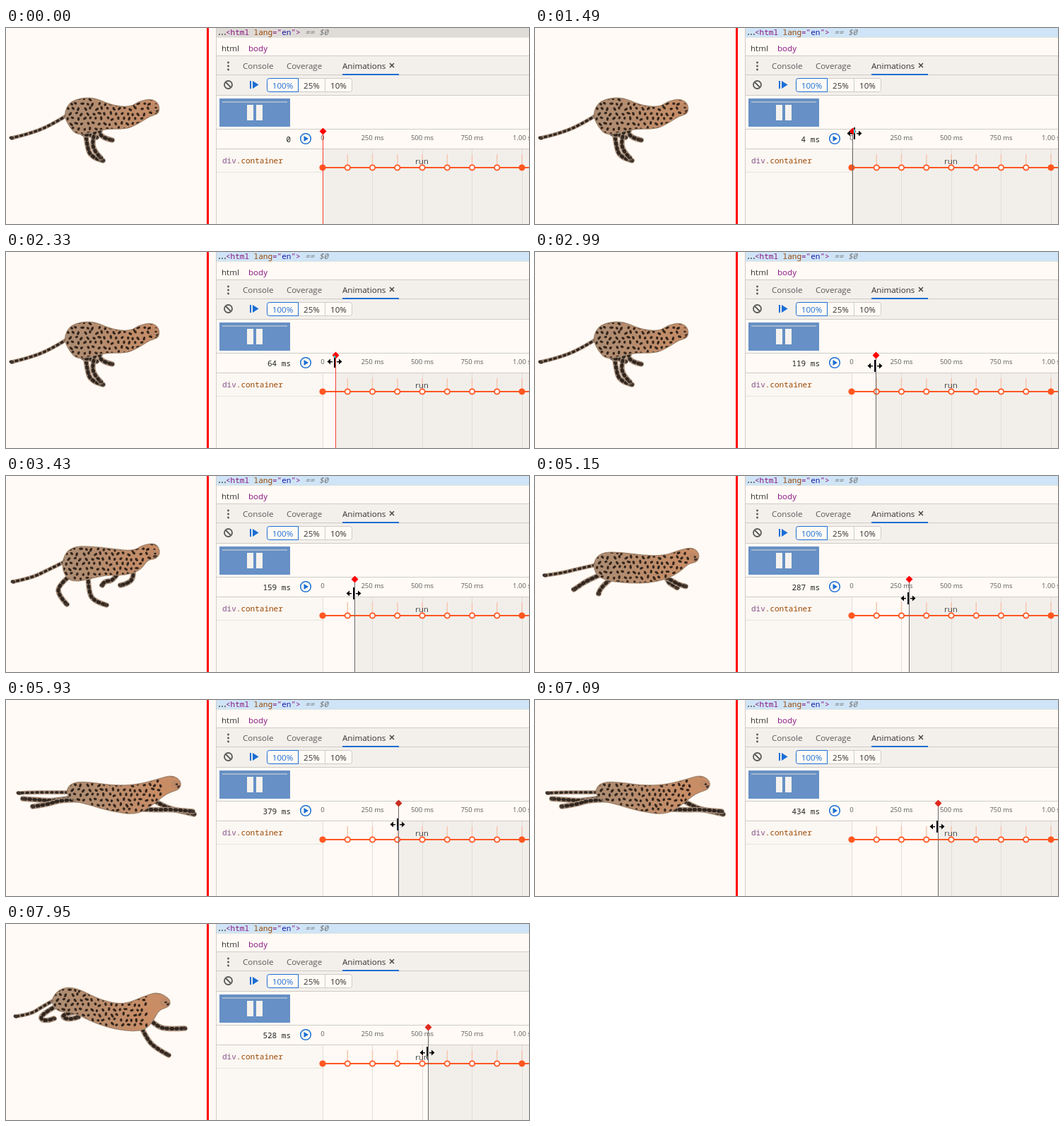
Animation of 740x278 px, one loop 8 s. Source, as an HTML page with a canvas:

```html
<!DOCTYPE html>
<html lang="en">
<head>
<meta charset="utf-8">
<title>Scrubbing an animation timeline</title>
<style>
html, body { margin: 0; width: 100%; height: 100%; overflow: hidden; background: #fffaf5; }
canvas { display: block; }
</style>
</head>
<body>
<canvas id="stage" width="740" height="278"></canvas>
<script>
const c = document.getElementById('stage').getContext('2d');
const SANS = '"Open Sans", sans-serif', MONO = '"Noto Sans Mono", monospace';
const CREAM = '#fffaf5', GREY = '#f3efeb', EDGE = '#cfcbc7', BLUE = '#1a6fd4', ORANGE = '#ff5722';
const LOOP = 8000, X0 = 448, SCALE = 0.282;

// Scrubber moves: start, end, steps, value in ms, cursor y
const MOVES = [
  [1240, 1490, 4, 4, 149], [1550, 1620, 2, 14, 150], [1860, 2100, 4, 60, 154],
  [2330, 2330, 1, 64, 155], [2490, 2570, 2, 89, 157], [2720, 3270, 8, 149, 165],
  [3430, 3430, 1, 159, 166], [3500, 3500, 1, 162, 166], [3650, 3730, 2, 174, 167],
  [4410, 4570, 3, 248, 171], [4660, 4660, 1, 256, 171], [4810, 5150, 5, 287, 173],
  [5360, 5440, 2, 297, 174], [5760, 5930, 3, 379, 176], [6380, 6470, 2, 402, 177],
  [6700, 7090, 6, 434, 179], [7250, 7500, 4, 470, 180], [7640, 7740, 2, 524, 182],
  [7950, 7950, 1, 528, 182]
];

// Cat poses: 16 outline points, then 4 each for tail, hind legs and forelegs
const gather = [
  82,122, 92,103, 122,98, 148,110, 175,113, 190,104, 206,101, 216,108,
  216,121, 204,124, 192,132, 172,143, 145,142, 125,146, 102,152, 90,140,
  86,124, 62,139, 30,151, 8,156,
  112,142, 114,164, 120,184, 137,188, 104,142, 108,152, 120,151, 128,155,
  138,140, 130,146, 137,156, 150,159, 128,140, 122,158, 124,174, 134,184];
const land = [
  80,118, 92,101, 120,100, 150,104, 180,107, 195,98, 212,96, 218,108,
  212,117, 200,118, 190,133, 170,140, 140,140, 120,145, 95,150, 82,140,
  82,122, 60,133, 35,145, 10,150,
  92,140, 73,156, 75,170, 86,182, 116,142, 117,165, 125,178, 142,183,
  160,135, 152,149, 139,149, 136,155, 180,133, 181,145, 171,153, 162,155];
const stretch = [
  85,128, 95,117, 120,117, 150,122, 185,121, 215,113, 235,107, 247,115,
  246,126, 232,130, 222,136, 205,150, 185,162, 150,158, 115,147, 92,142,
  87,131, 60,131, 38,131, 18,132,
  97,138, 70,143, 50,142, 24,140, 108,142, 80,141, 56,149, 38,151,
  205,140, 225,152, 245,157, 266,162, 190,155, 215,156, 235,155, 264,158];
const reach = [
  64,108, 76,92, 98,90, 130,107, 165,116, 196,103, 215,97, 232,107,
  231,117, 216,121, 209,135, 195,152, 160,150, 125,140, 95,124, 72,124,
  68,108, 50,118, 35,128, 14,131,
  72,116, 46,130, 55,139, 68,134, 103,124, 76,128, 88,137, 102,132,
  203,135, 215,147, 235,149, 253,148, 190,143, 200,165, 215,178, 230,186];
const push = land.map((n, i) => (n + stretch[i]) / 2);
const POSES = [gather, land, push, stretch, reach];

function rect(x, y, w, h, fill) { c.fillStyle = fill; c.fillRect(x, y, w, h); }

function text(s, x, y, fill, font = '11.6px ' + SANS, align = 'left') {
  c.font = font;
  c.fillStyle = fill;
  c.textAlign = align;
  c.fillText(s, x, y);
}

function code(x, y, ...runs) {
  for (const [s, fill, style = ''] of runs) {
    text(s, x, y, fill, style + ' 11px ' + MONO);
    x += c.measureText(s).width;
  }
}

function poly(fill, ...p) {
  c.beginPath();
  for (let i = 0; i < p.length; i += 2) c.lineTo(p[i], p[i + 1]);
  c.closePath();
  c.fillStyle = fill;
  c.fill();
}

function ring(x, y, r, width, stroke, fill) {
  c.beginPath();
  c.arc(x, y, r, 0, 7);
  if (fill) { c.fillStyle = fill; c.fill(); }
  c.lineWidth = width;
  c.strokeStyle = stroke;
  c.stroke();
}

function spot(x, y, rx, ry, turn, fill) {
  c.beginPath();
  c.ellipse(x, y, rx, ry, turn, 0, 7);
  c.fillStyle = fill;
  c.fill();
}

const noise = n => { const s = Math.sin(n * 127.1) * 43758.5; return s - Math.floor(s); };
const mid = (a, b) => [(a[0] + b[0]) / 2, (a[1] + b[1]) / 2];

function limb(p, width) {
  c.beginPath();
  c.moveTo(...p[0]);
  c.quadraticCurveTo(...p[1], ...mid(p[1], p[2]));
  c.quadraticCurveTo(...p[2], ...p[3]);
  c.lineWidth = width;
  c.strokeStyle = '#a68d7a';
  c.stroke();
  c.setLineDash([2, 5]);
  c.lineWidth = width * 0.65;
  c.strokeStyle = '#30261f';
  c.stroke();
  c.setLineDash([]);
  spot(...p[3], 3.5, 2.3, 0.3, '#40352d');
}

function cat(pose) {
  const p = [];
  for (let i = 0; i < pose.length; i += 2) p.push([pose[i], pose[i + 1]]);
  const body = p.slice(0, 16), [left, top] = body[0];
  c.save();
  c.filter = 'blur(0.5px)';
  c.lineCap = c.lineJoin = 'round';
  for (let i = 16; i < 36; i += 4) limb(p.slice(i, i + 4), i === 16 ? 5.5 : 7.5);

  c.beginPath();
  c.moveTo(...mid(body[15], body[0]));
  body.forEach((q, i) => c.quadraticCurveTo(...q, ...mid(q, body[(i + 1) % 16])));
  const fur = c.createLinearGradient(left, 0, left + 135, 0);
  fur.addColorStop(0, '#aa8c73');
  fur.addColorStop(1, '#c98d66');
  c.fillStyle = fur;
  c.strokeStyle = '#a1846c';
  c.lineWidth = 2.5;
  c.stroke();
  c.fill();
  c.clip();
  for (let row = 0; row < 10; row++) for (let col = 0; col < 17; col++) {
    const n = row * 17 + col + 1;
    spot(left + col * 8 + row % 2 * 4 + noise(n) * 3, top - 30 + row * 7 + noise(n + 300) * 3,
      2 + noise(n + 600), 1.7, noise(n + 900) * 3, '#33251c');
  }
  const [hx, hy] = mid(body[7], body[9]);
  spot(hx + 1, hy - 2, 8, 6, 0.5, '#bd8967');
  spot(hx + 2, hy - 3, 1.8, 1.3, 0, '#33251c');
  spot(...body[6], 3, 2.5, 0, '#57453a');
  spot(body[8][0] - 1, body[8][1] - 3, 3, 2, 0, '#4b3a31');
  c.restore();
}

function panel(active) {
  rect(284, 0, 3, 278, '#f00');
  rect(297, 0, 1, 278, EDGE);
  rect(298, 0, 442, 13, active ? '#cfe5f7' : '#dfdcd8');
  rect(298, 13, 442, 1, '#e9e5e0');
  for (let i = 0; i < 3; i++) {
    rect(301 + i * 4, 8, 2, 2, '#777');
    rect(313, 48 + i * 5, 3, 3, '#666');
  }
  code(311, 10, ['<html ', '#881280'], ['lang', '#994500'], ['="', '#881280'], ['en', '#1a1aa6'],
    ['">', '#881280'], [' == $0', '#777', 'italic']);
  text('html', 305, 33, '#333');
  text('body', 343, 33, '#881280');

  rect(298, 39, 442, 57, EDGE);
  rect(298, 40, 442, 26, GREY);
  rect(298, 67, 442, 28, GREY);
  for (let i = 0; i < 3; i++) {
    const dot = 48 + i * 5;
    spot(314.5, dot + 1, 1.4, 1.4, 0, '#555');
  }
  text('Console', 335, 58, '#5a5a5a');
  text('Coverage', 397, 58, '#5a5a5a');
  text('Animations', 476, 58, '#333');
  rect(476, 65, 80, 2, BLUE);
  c.lineWidth = 1.5;
  c.strokeStyle = '#444';
  c.beginPath();
  c.moveTo(543, 50); c.lineTo(549, 56);
  c.moveTo(549, 50); c.lineTo(543, 56);
  c.stroke();

  ring(314.5, 80.5, 5.5, 1.8, '#5a5a5a');
  c.beginPath();
  c.moveTo(311, 77); c.lineTo(318, 84);
  c.stroke();
  rect(345, 75, 2, 11, BLUE);
  poly(BLUE, 349, 75, 357.5, 80.5, 349, 86);
  c.lineWidth = 1;
  [['10%', 451.5, 38], ['25%', 413.5, 38], ['100%', 369.5, 44]].forEach(([s, x, w], i) => {
    c.beginPath();
    c.roundRect(x, 71.5, w, 19, i === 0 ? [0, 3, 3, 0] : i === 2 ? [3, 0, 0, 3] : 0);
    c.fillStyle = CREAM;
    c.fill();
    c.strokeStyle = i === 2 ? BLUE : EDGE;
    c.stroke();
    text(s, x + w / 2, 85.5, i === 2 ? BLUE : '#333', undefined, 'center');
  });

  rect(302, 100, 100, 40, '#6690c6');
  rect(306, 104, 92, 2, '#a5b5ce');
  rect(341, 109, 9, 22, '#f5f2ee');
  rect(354, 109, 9, 22, '#f5f2ee');
}

function timeline(value, x, lineColor, headColor) {
  rect(298, 143, 442, 1, EDGE);
  rect(298, 172, 150, 106, '#fbf7f2');
  rect(x, 172, 740 - x, 106, '#f2efeb');
  rect(298, 171, 442, 1, EDGE);
  rect(298, 204, 150, 1, '#e8e4df');
  text(value ? value + ' ms' : '0', 403, 162, '#222', '11px ' + MONO, 'right');
  ring(424, 157, 7.3, 1.5, BLUE);
  poly(BLUE, 421.5, 153, 428, 157, 421.5, 161);
  code(306, 192, ['div', '#84508a'], ['.container', '#994500']);

  ['0', '250 ms', '500 ms', '750 ms', '1.00 s'].forEach((s, i) => {
    const at = X0 + i * 70.5;
    rect(Math.floor(at), 172, 1, 106, '#e1ddd8');
    text(s, at, 159, '#5a5a5a', '9.5px ' + SANS, 'center');
  });
  for (let i = 1; i <= 8; i++) rect(X0 - 0.75 + i * 35.25, 179, 1.5, 15, '#f8c5b0');
  text('run', 588.5, 193, '#444', undefined, 'center');
  rect(X0, 197, 292, 2, ORANGE);
  for (let i = 0; i <= 8; i++)
    ring(X0 + i * 35.25, 198, 3.7, 1.8, ORANGE, i % 8 ? CREAM : ORANGE);

  rect(x, 149, 1, 129, lineColor);
  poly(headColor, x + 0.5, 141.5, x + 5.5, 146.5, x + 0.5, 151.5, x - 4.5, 146.5);
}

function cursor(kind, x, y) {
  if (kind === 'arrow') {
    poly('#000', x, y, x + 12, y + 12, x + 7, y + 12, x + 10, y + 18, x + 7, y + 19, x + 4, y + 13, x, y + 17);
    poly('#fff', x + 1, y + 2.4, x + 9.5, y + 11, x + 5.5, y + 11, x + 8.5, y + 17.5, x + 7.3, y + 18, x + 4.3, y + 11.5, x + 1, y + 14.6);
    return;
  }
  c.globalCompositeOperation = 'difference';
  if (kind === 'beam') {
    rect(x - 0, y - 7, 1, 15, '#fff');
    rect(x - 2, y - 8, 5, 1, '#fff');
    rect(x - 2, y + 8, 5, 1, '#fff');
  } else rect(x - 1, y - 8, 2, 17, '#fff');
  c.globalCompositeOperation = 'source-over';
  if (kind === 'resize') for (const side of [-1, 1]) {
    poly('#000', x + side * 10.5, y + 0.5, x + side * 6, y - 3.5, x + side * 6, y + 4.5);
    rect(side < 0 ? x - 7 : x + 3, y, 4, 1.4, '#000');
  }
}

function scrub(t) {
  let v = 0, y = 150;
  for (const [a, b, n, to, toY] of MOVES) {
    if (t < a) break;
    const k = n === 1 ? 1 : Math.min(n, 1 + Math.floor((t - a) / (b - a) * (n - 1) + 1e-6)) / n;
    v += (to - v) * k;
    y += (toY - y) * k;
  }
  return [Math.round(v), Math.round(y)];
}

function draw(t) {
  const [value, y] = scrub(t), x = Math.round(X0 + value * SCALE);
  const red = t < 1240 || t >= 2330 && t < 2490 || t >= 4410 && t < 4810;
  rect(0, 0, 740, 278, CREAM);
  cat(POSES[Math.min(4, Math.floor(value / 125))]);
  panel(t >= 1240);
  timeline(value, x, red ? '#fa3c32' : '#6b6767', t < 5760 ? '#f00' : t < 6380 ? '#c72c22' : '#e0281d');

  if (t >= 990) {
    const beam = t >= 4180 && t < 4810;
    const shift = beam && t >= 4410 ? 2 : value && value < 20 ? 3 : -1;
    cursor(beam ? 'beam' : 'resize', x + shift, y);
  } else if (t >= 320) {
    const k = Math.min(7, Math.floor((t - 320) / 75.7)) / 7;
    cursor(k < 0.8 ? 'arrow' : 'resize', Math.round(472 - 28 * k), Math.round(252 - 102 * k));
  }
}

const start = performance.now();
function tick(now) {
  draw(Math.max(0, now - start) % LOOP);
  requestAnimationFrame(tick);
}
draw(0);
requestAnimationFrame(tick);
</script>
</body>
</html>
```
